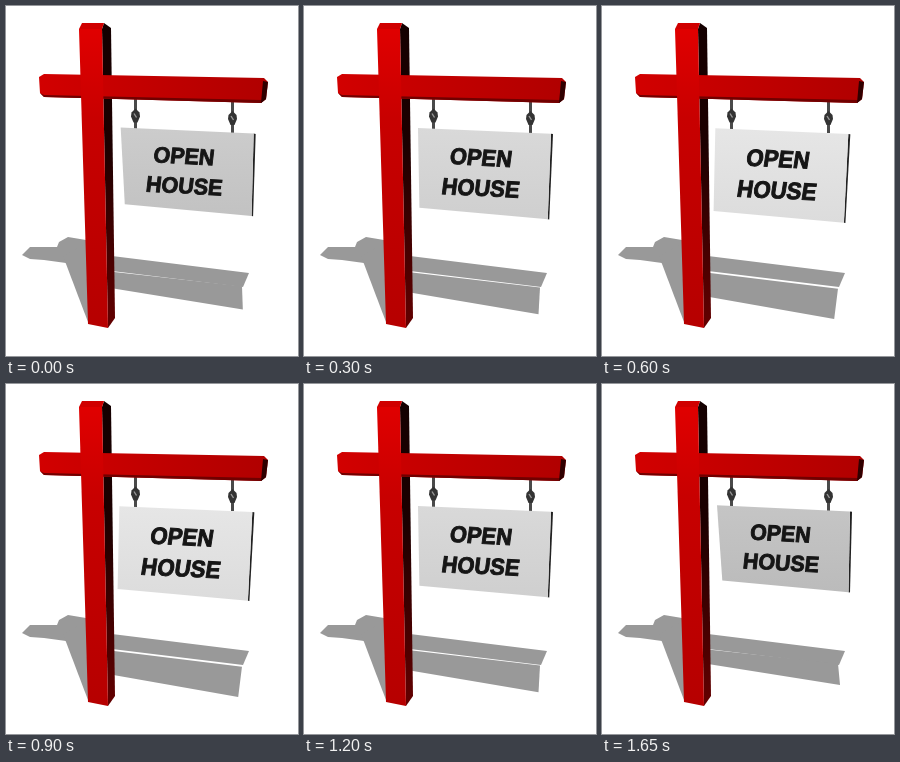
Animation, 292 px wide and 350 px high, one loop 1800 ms. Source, as an HTML page:

```html
<!DOCTYPE html>
<html lang="en">
<head>
<meta charset="utf-8">
<title>Open house sign</title>
<style>
  html, body { margin: 0; width: 100%; height: 100%; overflow: hidden; background: #fff; }
  svg { display: block; width: 292px; height: 350px; }
  text { font: bold 22px "Liberation Sans", Arial, sans-serif; text-anchor: middle; fill: #161616; stroke: #161616; stroke-width: .9; }
</style>
</head>
<body>
<svg viewBox="0 0 292 350">
  <defs>
    <linearGradient id="front" x2="0" y2="1">
      <stop offset="0" stop-color="#e00000"/><stop offset=".3" stop-color="#c80000"/><stop offset="1" stop-color="#b60000"/>
    </linearGradient>
    <linearGradient id="side" x2="0" y2="1">
      <stop offset="0" stop-color="#140000"/><stop offset=".4" stop-color="#1c0000"/><stop offset="1" stop-color="#640000"/>
    </linearGradient>
    <linearGradient id="beam">
      <stop offset="0" stop-color="#d20000"/><stop offset="1" stop-color="#b00000"/>
    </linearGradient>
    <g id="hook">
      <path d="M0 -20V12" stroke="#4a4a4a" stroke-width="3"/>
      <path d="M0 -10L4 -6 4.5 -2 2 4H-2L-4.5 -2 -4 -6Z" fill="#333"/>
      <path d="M-1.5 -5L1 -1" stroke="#999" stroke-width="1.4"/>
    </g>
  </defs>
  <g fill="#999">
    <path d="M16 249L24 241 51 241 53 236 62 231 80 234V257L60 257 38 254 24 253Z"/>
    <path d="M57 250L82 236V316Z"/>
    <path d="M106 250L243 267 237 281 106 265Z"/>
    <path id="shade"/>
  </g>
  <use href="#hook" x="129.5" y="112.5"/>
  <use href="#hook" x="226.5" y="115"/>
  <path d="M96 23L98 17 105 22 109 312 102 322Z" fill="url(#side)"/>
  <path d="M33 71L38 68 258 72 262 76 260 93 255 97 38 91 34 87Z" fill="url(#beam)"/>
  <path d="M34 87L38 89 256 94 260 91V93L255 97 38 91Z" fill="#700000"/>
  <path d="M257 75L262 76 260 93 255 97Z" fill="#300000"/>
  <path d="M73 23L96 23 102 322 82 318Z" fill="url(#front)"/>
  <path d="M73 23L76 17 98 17 96 23Z" fill="#d00000"/>
  <path id="edge" fill="#222"/>
  <linearGradient id="sheen" x2="0" y2="1">
    <stop id="light"/><stop id="dark" offset="1"/>
  </linearGradient>
  <path id="board" fill="url(#sheen)"/>
  <g id="words">
    <text x="-3.8" y="-8.5">OPEN</text>
    <text y="20.5">HOUSE</text>
  </g>
</svg>
<script>
const el = id => document.getElementById(id);
const poly = pts => 'M' + pts.map(p => p.map(n => n.toFixed(2)).join(' ')).join('L') + 'Z';
const mix = (a, b, t) => a + (b - a) * t;
const between = (a, b, t) => [mix(a[0], b[0], t), mix(a[1], b[1], t)];
const gray = n => `rgb(${n},${n},${n})`;

// s runs from 0 (swung back) to 1 (swung forward)
function draw(s) {
  const tl = between([115, 121.3], [113, 122.5], s);
  const tr = between([248, 127.5], [246, 128], s);
  const br = between([246.5, 208.3], [241, 218.3], s);
  const bl = between([120.3, 196.5], [109.5, 206.8], s);
  bl[0] += 2 * s * (1 - s);
  const tone = Math.round(mix(194, 234, s));

  el('light').setAttribute('stop-color', gray(tone + 3));
  el('dark').setAttribute('stop-color', gray(tone - 7));
  el('board').setAttribute('d', poly([tl, tr, br, bl]));
  el('edge').setAttribute('d', poly([tr, [tr[0] + 2, tr[1] + .3], [br[0] + 1.5, br[1] + .3], br]));

  const cx = (tl[0] + tr[0] + br[0] + bl[0]) / 4;
  const cy = (tl[1] + tr[1] + br[1] + bl[1]) / 4;
  const slope = (tr[1] + br[1] - tl[1] - bl[1]) / 268 * .75;
  const lean = (bl[0] + br[0] - tl[0] - tr[0]) / 160 - .13;
  el('words').setAttribute('transform',
    `matrix(${mix(.97, 1.02, s)} ${slope} ${lean} ${mix(1, 1.09, s)} ${cx + mix(-2, -1, s)} ${cy + 2.3})`);

  el('shade').setAttribute('d', poly([
    [106, mix(265.5, 267, s)], [236, mix(279.5, 283.5, s)],
    [mix(238, 231, s), mix(301, 315.5, s)],
    [106, mix(280, 293, s)]
  ]));
}

function frame(now) {
  const step = Math.floor(now % 1800 / 150);
  const k = (step + 1) % 12;
  draw((k < 6 ? k : 12 - k) / 6);
  requestAnimationFrame(frame);
}
frame(performance.now());
</script>
</body>
</html>
```
